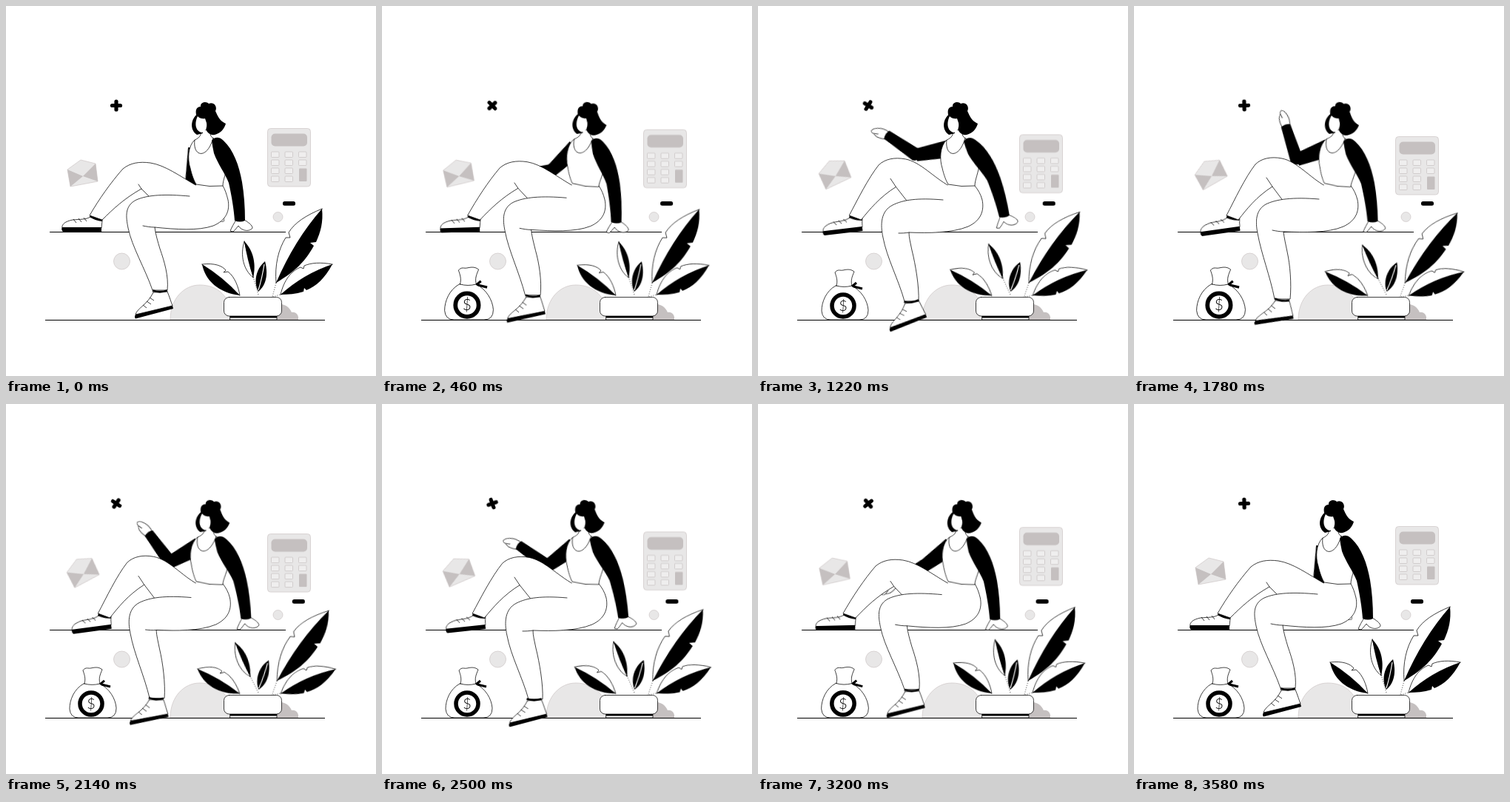
An HTML page without scripts for the animation above (3600 ms loop, 500 by 500 pixels).

```html
<!DOCTYPE html>
<html lang="en">
<head>
<meta charset="utf-8">
<title>Budget illustration</title>
<style>
html, body { margin: 0; width: 100%; height: 100%; overflow: hidden; background: #fff; }
svg { display: block; width: 100vw; height: 100vh; stroke-width: .75; }

.ink { fill: #000; stroke: none; }
.line { fill: none; stroke: #000; }
.part { fill: #fff; stroke: #000; stroke-linejoin: round; stroke-linecap: round; }
.pale { fill: #e8e7e7; }
.mid { fill: #c5c0c0; }
.edge { stroke: #cfc8c8; }

/* Slow drift: there and back once per loop */
.drift { animation: 1.8s cubic-bezier(.37, 0, .63, 1) infinite alternate; }
.sway { animation-name: sway; }
.slide { animation-name: slide; }
@keyframes sway { to { transform: rotate(var(--turn)); } }
@keyframes slide { to { transform: translate(var(--x, 0), var(--y, 0)); } }

.spin { transform-origin: 149px 134.5px; animation: spin 3.6s linear infinite; }
@keyframes spin { to { transform: rotate(360deg); } }

.pose { animation: 3.6s ease-in-out infinite; }

.bag { transform-origin: 117px 424px; animation-name: bag; }
@keyframes bag {
  0% { transform: scale(0); }
  14% { transform: scale(1.06); }
  21%, 36%, 61%, 70%, 92%, 100% { transform: scale(1); }
  49.4% { transform: scale(1.045); }
  80.6% { transform: scale(1.08, 1.06); }
}

.torso { transform-origin: 275px 243px; animation-name: torso; }
@keyframes torso {
  0%, 33.9%, 100% { transform: rotate(0deg); }
  16% { transform: rotate(4.8deg); }
  23.9% { transform: rotate(4deg); }
  49.4% { transform: rotate(4.8deg); }
  69.4% { transform: rotate(2.5deg); }
  80.6% { transform: rotate(5.4deg); }
}

.prop { transform-origin: 288px 182px; animation-name: prop; }
@keyframes prop {
  0%, 100% { transform: rotate(0deg); }
  23.9% { transform: rotate(-4deg); }
  33.9% { transform: rotate(-9.2deg); }
  49.4% { transform: rotate(-5.6deg); }
  69.4% { transform: rotate(-6.5deg); }
  80.6% { transform: rotate(-6deg); }
}

.upper { animation-name: upper; }
@keyframes upper {
  0%, 100% { transform: rotate(-80deg); }
  23.9% { transform: rotate(-21deg); }
  33.9% { transform: rotate(-10deg); }
  49.4% { transform: rotate(-25deg); }
  69.4% { transform: rotate(-38deg); }
  80.6% { transform: rotate(-14deg); }
}

.fore { animation-name: fore; }
@keyframes fore {
  0%, 100% { transform: rotate(-50deg); }
  23.9% { transform: rotate(101deg); }
  33.9% { transform: rotate(44deg); }
  49.4% { transform: rotate(92deg); }
  69.4% { transform: rotate(71deg); }
  80.6% { transform: rotate(38deg); }
}

.hand { transform-origin: -46px 0; animation-name: hand; }
@keyframes hand {
  0%, 23.9%, 49.4%, 100% { transform: rotate(0deg); }
  33.9%, 69.4%, 80.6% { transform: rotate(-20deg); }
}

.back-leg { animation-name: back-leg; }
.back-shoe { transform-origin: 121px 286px; animation-name: back-shoe; }
@keyframes back-leg {
  0%, 100% {
    d: path("M258 243C235 230 215 215 195 212C180 210 168 212 158 220C142 238 125 262 113 283L130 289C145 274 160 260 183 247L200 264L258 264M179 241L183 247");
    animation-timing-function: cubic-bezier(.3, 0, .5, 1);
  }
  49.4% {
    d: path("M258 243C238 232 220 210 200 206C185 203 172 206 164 214C150 232 136 262 125 283L141 289C152 275 165 258 187 244L202 264L258 264M179 232L187 244");
    animation-timing-function: cubic-bezier(.5, 0, .7, 1);
  }
}
@keyframes back-shoe {
  0%, 100% { transform: none; animation-timing-function: cubic-bezier(.3, 0, .5, 1); }
  49.4% { transform: translate(12px, 0) rotate(-8deg); animation-timing-function: cubic-bezier(.5, 0, .7, 1); }
}

.front-leg { animation-name: front-leg; }
.front-shoe { transform-origin: 208px 386px; animation-name: front-shoe; }
@keyframes front-leg {
  0%, 100% {
    d: path("M248 257C215 254 192 255 176 262C160 270 162 285 165 300C170 325 188 355 198 384L218 384C220 365 214 345 208 328C205 318 202 308 201 299C230 302 260 304 280 297C297 290 303 277 300 262C298 254 296 248 293 243M185 297C190 298 195 299 201 299");
  }
  23.9%, 49.4% {
    d: path("M250 261C215 258 192 261 178 268C164 276 164 292 167 307C172 335 184 365 190 396L211 396C213 375 211 350 207 332C205 322 203 314 202 305C230 306 262 307 283 298C300 290 305 277 302 262C300 254 297 248 293 243M187 303C192 304 197 305 202 305");
  }
  33.9%, 69.4% {
    d: path("M250 262C215 259 196 262 182 269C166 277 165 295 169 313C174 340 190 370 198 399L217 399C218 380 213 350 208 330C206 320 204 313 204 306C230 307 262 307 284 298C301 290 306 277 303 262C301 254 297 248 293 243M190 307C194 307 199 307 204 306");
    animation-timing-function: cubic-bezier(.2, .4, .5, 1);
  }
}
@keyframes front-shoe {
  0%, 100% { transform: translate(0, 0) rotate(0deg); }
  23.9% { transform: translate(-7.5px, 12px) rotate(4deg); }
  33.9% {
    transform: translate(-.5px, 14px) rotate(-7deg);
    animation-timing-function: cubic-bezier(.2, .4, .5, 1);
  }
  49.4% { transform: translate(-8px, 12px) rotate(6deg); }
  69.4% {
    transform: translate(-2.5px, 14px) rotate(0deg);
    animation-timing-function: cubic-bezier(.2, .4, .5, 1);
  }
}
</style>
</head>
<body>
<svg viewBox="0 0 500 500">
  <defs>
    <rect id="key" width="10.5" height="7.5" rx="1" fill="#efeeee" stroke="#cbc6c6" stroke-width=".8"/>
    <g id="keys">
      <use href="#key"/>
      <use href="#key" x="18.5"/>
    </g>
  </defs>

  <!-- Scenery -->
  <path class="pale edge" d="M222 424C222 396 240 377 262 377C286 377 303 392 308 424Z"/>
  <path class="mid" d="M362 424V404C374 400 383 406 386 414C392 413 396 418 395 424Z"/>
  <circle class="pale edge" cx="156.5" cy="345" r="11"/>
  <circle class="pale edge" cx="367.5" cy="285" r="6.5"/>
  <path class="line" d="M59 305.5H378M53 424.5H431" stroke-width="1"/>

  <path class="spin" d="M149 129V140M143.5 134.5H154.5" stroke="#000" stroke-width="5.2" stroke-linecap="round"/>
  <rect class="drift slide ink" style="--x:14px" x="374" y="264" width="17" height="5.8" rx="2.5"/>

  <g class="drift sway" style="--turn:-19deg;transform-origin:104px 227px">
    <path class="pale edge" d="M83 221L101 208L121 213L124 237L87 244Z"/>
    <path class="mid" d="M83 221L104 230L87 244ZM121 213L124 237L104 230Z"/>
  </g>

  <g class="drift slide" style="--y:11px">
    <rect class="pale edge" x="353.5" y="165.5" width="58" height="78.5" rx="4"/>
    <rect class="mid" x="358.5" y="172.5" width="48.5" height="17" rx="5"/>
    <use href="#keys" x="358.5" y="197"/>
    <use href="#keys" x="358.5" y="208"/>
    <use href="#keys" x="358.5" y="219"/>
    <use href="#keys" x="358.5" y="230"/>
    <use href="#key" x="395.5" y="197"/>
    <use href="#key" x="395.5" y="208"/>
    <rect class="mid" x="396" y="219.5" width="10.5" height="17.5" rx="1"/>
  </g>

  <g class="pose bag">
    <path class="part" d="M105 378C92 385 86 400 86 412Q87 424 98 424H137Q149 424 149 411C148 398 140 385 127 378Z"/>
    <path class="part" d="M106 378C108 371 106 366 104 360C108 355 111 358 115 357C120 356 125 355 130 359C127 366 125 371 127 378Q116 381 106 378Z"/>
    <path class="line" d="M127 379L133 374M129 379L141 382" stroke-width="3"/>
    <circle cx="115" cy="405" r="15" fill="#fff" stroke="#000" stroke-width="5.5"/>
    <text x="115" y="412" text-anchor="middle" font-family="Lato, sans-serif" font-weight="300" font-size="20">$</text>
  </g>

  <!-- Plant -->
  <g>
    <g class="drift sway" style="--turn:-10deg;transform-origin:318px 392px">
      <path class="part" d="M265 349C282 347 292 351 297 357L294 360L300 359C309 366 314 379 316 391Z"/>
      <path class="ink" d="M265 349C269 371 288 388 316 391Q293 366 265 349Z"/>
    </g>
    <g class="drift sway" style="--turn:-11deg;transform-origin:341px 390px">
      <path class="line" d="M334 366L341 390" stroke-dasharray="1 2"/>
      <path class="part" d="M322 318C316 337 321 357 334 367Z"/>
      <path class="ink" d="M322 318C335 331 338 350 334 367Q326 343 322 318Z"/>
    </g>
    <g class="drift sway" style="--turn:7deg;transform-origin:341px 390px">
      <path class="ink" d="M350 345C336 357 335 375 341 386C353 376 354 360 350 345Z"/>
      <path d="M349 349Q346 368 341 384" fill="none" stroke="#fff" stroke-width="1.2"/>
    </g>
    <g class="drift sway" style="--turn:5deg;transform-origin:366px 390px">
      <path class="line" d="M365 374L360 393" stroke-dasharray="1 2"/>
      <path class="part" d="M427 274C405 283 390 293 382 306L384 313L378 313C368 329 363 350 365 374Z"/>
      <path class="ink" d="M427 274C429 292 425 306 419 319L411 320L416 324C405 344 391 359 365 374Q390 316 427 274Z"/>
    </g>
    <g class="drift sway" style="--turn:7deg;transform-origin:360px 393px">
      <path class="line" d="M373 389L358 394" stroke-dasharray="1 2"/>
      <path class="part" d="M441 349C425 346 412 347 403 351L402 355L398 353C386 358 376 369 371 390Z"/>
      <path class="ink" d="M441 349C431 368 419 379 406 384L403 381L402 386C392 389 381 390 371 390Q402 362 441 349Z"/>
    </g>
    <path class="part" d="M303 419H366V424H303Z"/>
    <path class="ink" d="M303 419H366V421.5H303Z"/>
    <rect class="part" x="294.5" y="393.5" width="78" height="25.5" rx="7"/>
  </g>

  <!-- Gesturing arm, behind the body -->
  <g class="pose torso">
    <g transform="translate(258 193)">
      <g class="pose upper">
        <path class="ink" d="M0 -12L-45 -8V9L0 12Z"/>
        <g transform="translate(-45 0)">
          <g class="pose fore">
            <g class="pose hand">
              <path class="part" d="M-46 -5C-52 -8 -60 -8 -67 -4C-71 -1 -69 2 -65 2C-62 6 -55 7 -46 5Z"/>
              <path class="line" d="M-65 2L-59 1"/>
            </g>
            <path class="ink" d="M0 -8.500L-48 -6.500Q-51 0 -48 6.500L0 9A9 9 0 0 0 0 -8.500Z"/>
          </g>
        </g>
      </g>
    </g>
  </g>

  <!-- Legs -->
  <g class="pose back-shoe">
    <path class="part" d="M114 285L130 290L129 300H76C75 295 80 291 90 289C100 288 108 289 114 285Z"/>
    <path class="ink" d="M76 299H129V305H77Q74 302 76 299ZM114 281.5Q122 287 131 287.5L130 291Q120 290 113 285Z"/>
    <path class="line" d="M91 288L95 293M98 287L102 292M105 286L109 291"/>
  </g>
  <path class="part pose back-leg"/>
  <path d="M257 241H293L297 264H250Z" fill="#fff"/>
  <g class="pose front-shoe">
    <path class="part" d="M199 387L218 386C221 393 223 400 225 405L175 417C177 410 185 406 190 400C194 396 197 391 199 387Z"/>
    <path class="ink" d="M175 417L225 405L226 409L175 422.5Q173 420 175 417Z"/>
    <path class="line" d="M185 404L190 408M190 399L196 403M194 394L200 398"/>
  </g>
  <path class="part pose front-leg"/>
  <path class="line pose front-shoe" d="M198 384.5Q208 388 218 384.5" stroke-width="2.8"/>

  <!-- Upper body -->
  <g class="pose torso">
    <path class="part" d="M264 168C264 174 262 178 255 181C246 189 245 207 249 219C251 228 254 236 257 241Q275 245 293 243C293 235 298 225 299 214C301 200 290 184 279 178Q275 175 276 168Z"/>
    <path class="line" d="M255 181C252 204 272 208 280 178"/>
    <g class="pose prop">
      <path class="part" d="M311 289C308 294 305 299 303 304L307 305Q311 301 314 297C319 305 330 305 333 300C333 296 327 292 322 289Z"/>
      <path class="ink" d="M278 182C282 176 289 177 294 182C307 194 315 215 319 238Q323 262 323 290Q316 293 309 290C308 275 305 257 301 239C296 226 286 213 281 199Q279 190 278 182Z"/>
    </g>
    <path class="ink" d="M260 145C249 152 248 168 258 174L266 172L262 150Z"/>
    <path class="ink" d="M258 150C255 142 257 136 263 136C262 130 271 128 274 132C281 129 286 136 283 142C286 148 288 155 297 159C295 166 290 172 282 174C275 175 270 170 270 164Z"/>
    <path d="M259 149C255 157 255 168 264 171C270 170 272 164 271 158L269 152Q263 153 259 149Z" fill="#fff"/>
  </g>
</svg>
</body>
</html>
```
